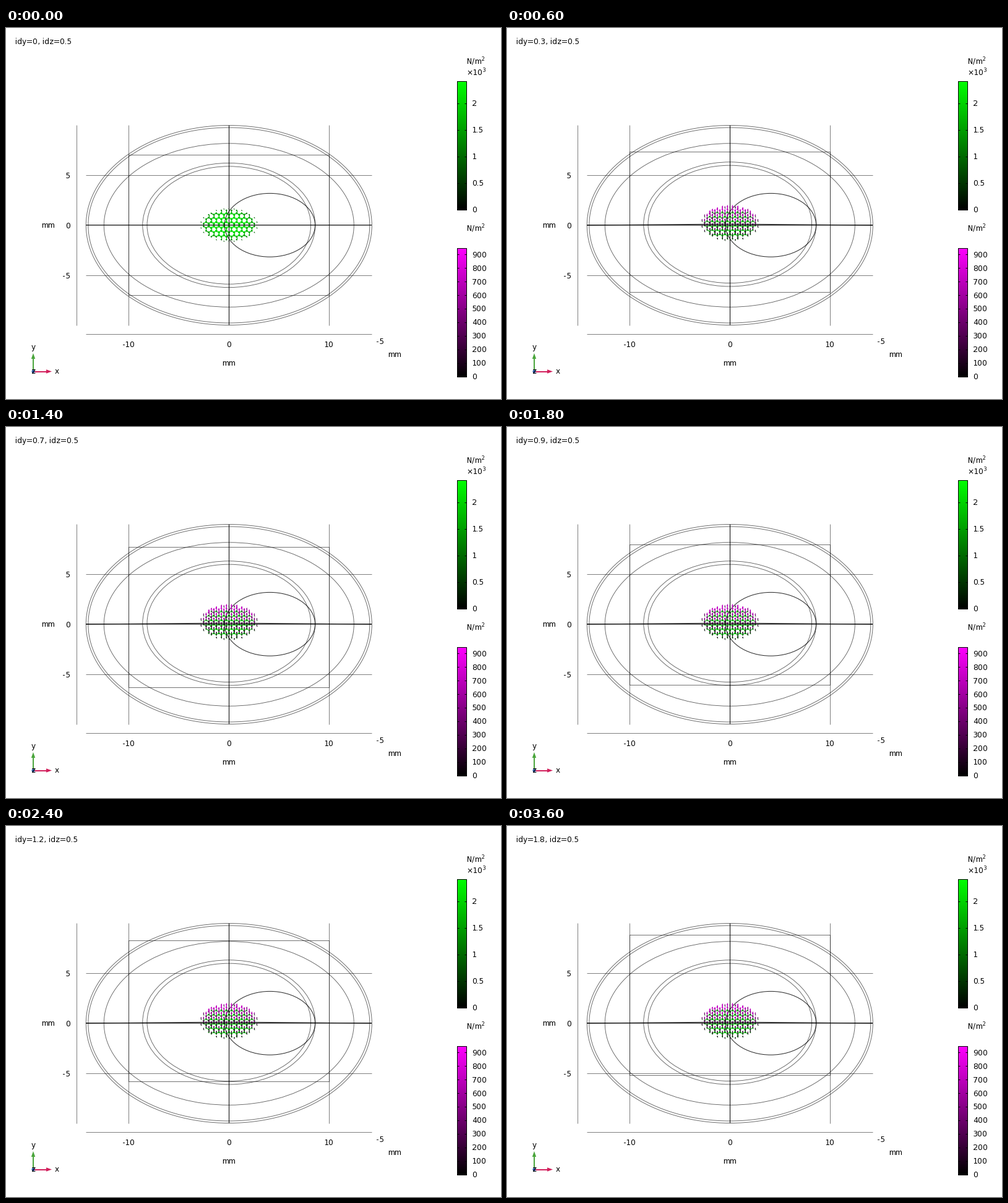
Write a matplotlib script that moves like this. It is 800 by 600 pixels and loops after 3.8 s.

```python
import numpy as np
import matplotlib.pyplot as plt
from matplotlib.animation import FuncAnimation
from matplotlib.collections import LineCollection, PolyCollection
from matplotlib.patches import Ellipse, Polygon

W, H, DPI = 800, 600, 100
PX = 72 / DPI                # one pixel in points
CX, CY, MM = 360.3, 319, 16.22
STEPS = 19
CONTACT_LIFT = 0.1           # the eye slips after this much travel (mm)

# whole-pixel glyph advances
plt.rcParams.update({"font.family": "DejaVu Sans", "text.hinting_factor": 1})
fig = plt.figure(figsize=(W / DPI, H / DPI), dpi=DPI, facecolor="white")
ax = fig.add_axes([0, 0, 1, 1])


def line(xs, ys, color="black", alpha=1.0, width=1.0, z=3, snap=None):
    """Straight lines snap to the pixel whose index is given."""
    return ax.plot(xs, ys, color=color, alpha=alpha, lw=width * PX, zorder=z,
                   snap=snap, solid_capstyle="butt")[0]


def text(x, y, label, ha="left"):
    return ax.text(x, y, label, ha=ha, va="baseline", fontsize=12 * PX,
                   color="black", zorder=9)


def ellipse(x, y, rx, ry, alpha=0.62, width=0.9, z=3):
    ring = Ellipse((x, y), 2 * rx, 2 * ry, fill=False, ec="black",
                   alpha=alpha, lw=width * PX, zorder=z)
    ax.add_patch(ring)
    return ring


def colorbar(top, bottom, rgb, ticks):
    left, right = 729, 744
    ramp = np.linspace(1, 0, 256)[:, None, None] * np.array(rgb)
    ax.imshow(ramp, extent=(left, right, bottom, top), aspect="auto", zorder=2)
    line([left, right, right, left, left], [top, top, bottom, bottom, top])
    for y, label in ticks:
        line([left, left + 3], [y - 0.5, y - 0.5])
        line([right - 3, right], [y - 0.5, y - 0.5])
        text(753, round(y + 4), label)


def lattice():
    """Honeycomb points inside the contact ellipse, with relative radius."""
    a = 8.2
    bond = a / np.sqrt(3)
    pts = []
    for j in range(-8, 9):
        for i in range(-12, 13):
            x = (i + (j % 2) / 2) * a
            y = j * bond * 1.5
            pts += [(x, y - bond / 2), (x, y + bond / 2)]
    pts = np.array(pts)
    r = np.hypot(pts[:, 0] / 47.5, pts[:, 1] / 27)
    return pts[r < 1], r[r < 1], bond


def shade(green):
    return np.c_[0 * green, green, 0 * green]


def dots(pts, diameter, green, z):
    return ax.scatter(pts[:, 0], pts[:, 1], s=(diameter * PX) ** 2,
                      c=shade(green), lw=0, zorder=z)


def strokes(starts, ends, colors, width, z):
    return ax.add_collection(LineCollection(
        np.stack([starts, ends], axis=1), colors=colors, lw=width * PX, zorder=z))


# grid, axes and frame
for x in (114, 198, 522):
    line([x, x], [157, 481], alpha=0.5)
for y in (238, 400, 495):
    line([129, 591], [y, y], alpha=0.5)
line([129, 591], [CY - 0.2, CY - 0.2], width=1.2, z=6, snap=False)
line([360, 360], [157, 480], z=6)

# fixed outlines
ellipse(CX, CY, 231, 161.5)
ellipse(CX, CY, 227.5, 158)
ellipse(CX, CY, 202, 132.3)
ellipse(426.4, 318.8, 73.2, 51.4, alpha=0.85, width=1, z=4)

# moving outlines
rings = [ellipse(CX, CY, 139.5, 100.6), ellipse(CX, CY, 132.3, 95.2)]
box = line([], [], alpha=0.55)
tent = line([], [], alpha=0.85, z=6)

# contact pressure
rng = np.random.default_rng(4)
pts, rad, bond = lattice()
push = np.sqrt(1 - rad ** 2)
noise = rng.random(len(pts))
base = pts + (CX, CY - 0.5)
green = np.clip(0.35 + 0.75 * push - 0.12 * noise, 0, 0.93)
size = 1.1 + 2.7 * np.clip(push * 1.6 - 0.25, 0, 1)

gap = np.hypot(*(pts[:, None] - pts[None]).transpose(2, 0, 1))
p, q = np.nonzero(np.triu((gap > 0) & (gap < bond * 1.1)))
inner = push[p] * push[q] > 0.2
p, q = p[inner], q[inner]
bonds = shade(green[p])

rest = [strokes(base[p], base[q], bonds, 1.2, 1.9),
        dots(base, size, green, 2),
        dots(base + (0.6, 0.8), 1.0, 0.1 + 0.2 * noise, 2.1)]

# friction arrows
lifted = base - (0, CONTACT_LIFT * MM)
grip = np.clip(push * 1.9, 0, 1) * np.clip(0.85 - pts[:, 1] / 80, 0.5, 1)
tips = lifted - np.c_[0 * grip, 7.8 * grip]
mag = np.clip(0.4 + 0.3 * grip - pts[:, 1] / 70 - 0.25 * noise, 0.15, 0.85)
purple = np.c_[mag, 0 * mag, mag]
heads = [[(x, y), (x - w, y + h), (x + w, y + h)]
         for (x, y), w, h in zip(tips, 0.4 + 1.2 * grip, 1 + 3 * grip)]
slip = [strokes(lifted[p], lifted[q], bonds, 0.9, 1.9),
        dots(lifted, size * 0.92, green * 0.88, 2),
        dots(lifted + (0.6, 1), 1.1, 0.1 + 0.2 * noise, 2.1),
        strokes(lifted, tips, purple * 0.7, 0.8, 5),
        ax.add_collection(PolyCollection(
            heads, facecolors=purple, edgecolors="none", zorder=5.1))]

# color scales
colorbar(86, 294, (0, 1, 0),
         [(294 - 43 * k, f"{k / 2:g}") for k in range(5)])
colorbar(356, 564, (1, 0, 1),
         [(564 - 21.9 * k, f"{100 * k}") for k in range(10)])
text(743.5, 59, "N/m$^2$")
text(743.5, 77, "×10$^3$")
text(743.5, 329, "N/m$^2$")

# axis labels
for x, y, label, ha in [
        (104, 243, "5", "right"), (104, 324, "0", "right"),
        (104, 405, "-5", "right"), (198, 516, "-10", "center"),
        (360, 516, "0", "center"), (522, 516, "10", "center"),
        (598, 511, "-5", "left"), (57, 323, "mm", "left"),
        (360, 546, "mm", "center"), (617, 532, "mm", "left")]:
    text(x, y, label, ha)

# orientation triad
GREEN, RED, BLUE = "#4aa53c", "#d2205c", "#2b5aa8"
line([44, 44], [555, 533], GREEN, width=2)
line([44, 67], [555.5, 555.5], RED, width=2)
ax.add_patch(Polygon([(44, 526), (40.8, 535), (47.2, 535)], fc=GREEN, lw=0, zorder=4))
ax.add_patch(Polygon([(74, 555.5), (65, 552.3), (65, 558.7)], fc=RED, lw=0, zorder=4))
ax.add_patch(Ellipse((44, 555.5), 5, 5, fc=BLUE, lw=0, zorder=5))
text(44, 520, "y", "center")
text(44, 559, "z", "center")
text(79, 559, "x")

title = text(15, 26, "")

ax.set(xlim=(0, W), ylim=(H, 0))
ax.axis("off")


def draw(step):
    idy = step / 10
    title.set_text(f"idy={idy:g}, idz=0.5")

    top, bottom = (int(CY - (side + idy) * MM) for side in (7, -7))
    box.set_data([198, 522, 522, 198, 198], [top, top, bottom, bottom, top])

    lift = min(idy, CONTACT_LIFT) * MM
    for ring in rings:
        ring.set_center((CX, CY - lift))
    tent.set_data([129, CX, 591], [CY, CY - 1.3 * lift, CY])
    tent.set_visible(step > 0)
    for art in rest:
        art.set_visible(step == 0)
    for art in slip:
        art.set_visible(step > 0)
    return []


anim = FuncAnimation(fig, draw, frames=STEPS, interval=200, repeat=True,
                     repeat_delay=0, init_func=lambda: draw(0), blit=False)
plt.show()
```
